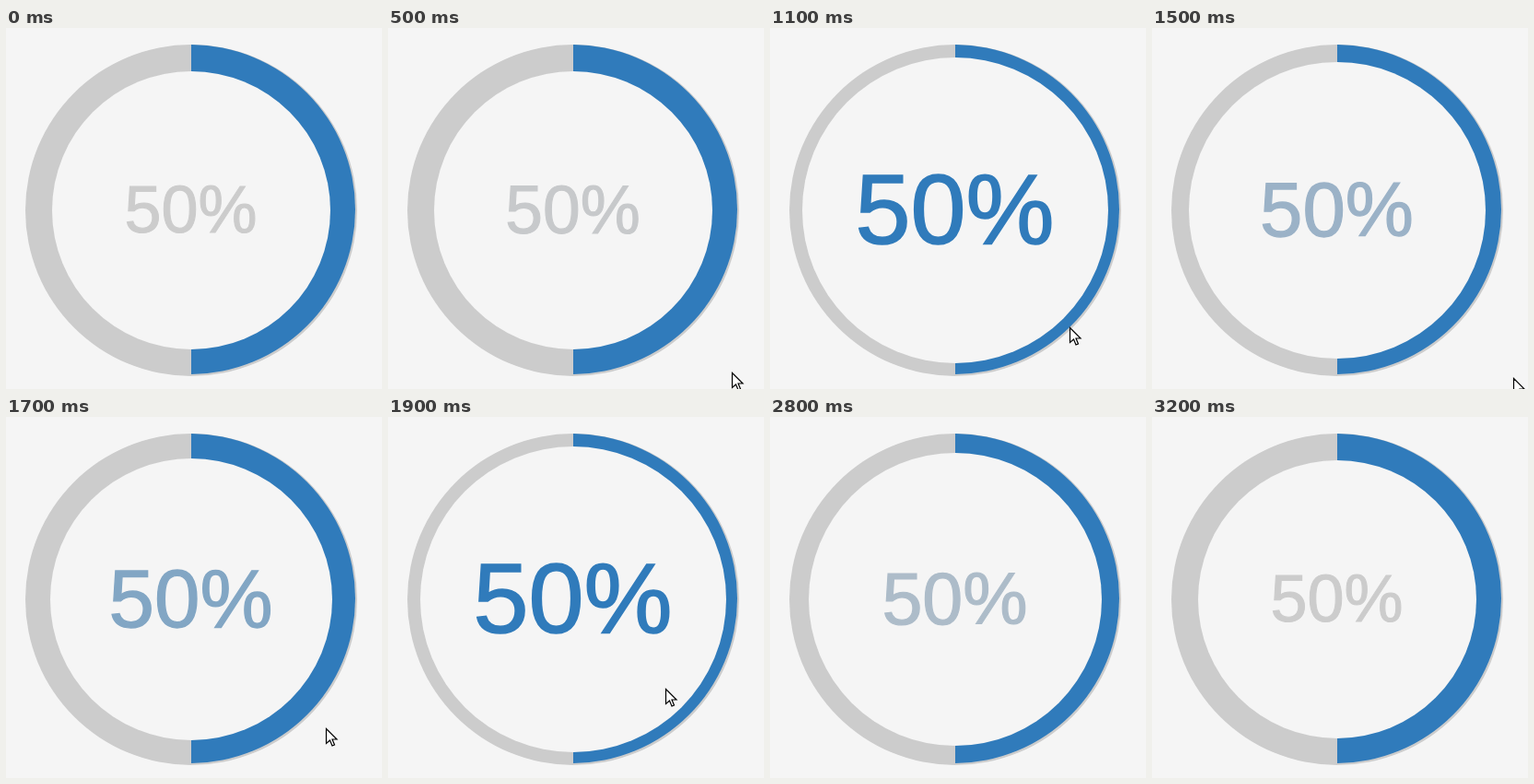
An HTML page with a canvas that plays this animation: 408 by 392 pixels, repeating every 3300 ms.

```html
<!DOCTYPE html>
<html lang="en">
<head>
<meta charset="utf-8">
<title>Percentage circle</title>
<style>
  html, body { margin: 0; width: 100%; height: 100%; overflow: hidden; background: #f5f5f5; }
  canvas { display: block; }
</style>
</head>
<body>
<canvas id="stage" width="408" height="392"></canvas>
<script>
const ctx = document.getElementById('stage').getContext('2d');
const LOOP = 3300, STEP = 100, DURATION = 250;
const SIZE = 360, CX = 201, CY = 198;
const PAPER = '#f5f5f5', GREY = [204, 204, 204], BLUE = [48, 123, 187];

// The pointer is over the circle between these times
const hovers = [{ enter: 495, leave: 1375 }, { enter: 1620, leave: 2645 }];

// Turning points of the pointer, joined by straight moves
const turns = [
  { at: 400, x: 391, y: 393 },
  { at: 1000, x: 285, y: 277 },
  { at: 1200, x: 364, y: 372 },
  { at: 1500, x: 392, y: 380 },
  { at: 1900, x: 301, y: 295 },
  { at: 2600, x: 206, y: 386 }
];
const arrow = new Path2D('M0 0V16L4 12.5L6.5 18.5L9 17.5L6.5 11.5H11.5Z');

const clamp = v => Math.min(1, Math.max(0, v));
const mix = (a, b, p) => a + (b - a) * p;
const rgb = c => `rgb(${c.map(Math.round).join(',')})`;

// cubic-bezier(.42, 0, 1, 1), solved by bisection
function easeIn(t) {
  if (t <= 0 || t >= 1) return clamp(t);
  let lo = 0, hi = 1;
  for (let i = 0; i < 24; i++) {
    const s = (lo + hi) / 2, r = 1 - s;
    if (1.26 * r * r * s + 3 * r * s * s + s ** 3 < t) lo = s; else hi = s;
  }
  return 3 * (1 - lo) * lo * lo + lo ** 3;
}
const easeOut = t => 1 - easeIn(1 - t);

function hoverAmount(time, ease) {
  const done = start => ease(clamp((time - start) / DURATION));
  return hovers.reduce((sum, h) => sum + done(h.enter) - done(h.leave), 0);
}

function disc(x, y, radius, color) {
  ctx.fillStyle = color;
  ctx.beginPath();
  ctx.arc(x, y, radius, 0, Math.PI * 2);
  ctx.fill();
}

function drawRing(p) {
  disc(CX, CY, SIZE / 2, rgb(GREY));
  ctx.save();
  ctx.beginPath();
  ctx.rect(CX, 0, SIZE, 392);
  ctx.clip();
  disc(CX - 1, CY - 1, SIZE / 2 - 1, rgb(BLUE));
  ctx.restore();
  disc(CX, CY, SIZE / 2 - Math.round(SIZE * mix(0.08, 0.04, p)), PAPER);
}

function drawLabel(p) {
  const size = SIZE * mix(0.2, 0.3, p);
  const baseline = CY + size * 0.337;
  ctx.font = `${size}px "Liberation Sans", Arial, sans-serif`;
  ctx.textAlign = 'center';
  ctx.fillStyle = ctx.strokeStyle = rgb(GREY.map((c, i) => mix(c, BLUE[i], p)));
  ctx.lineWidth = size * 0.015;
  ctx.lineJoin = 'miter';
  ctx.fillText('50%', CX - 0.5, baseline);
  ctx.strokeText('50%', CX - 0.5, baseline);
}

function drawPointer(time) {
  const next = turns.findIndex(turn => turn.at > time);
  if (next < 1) return;
  const a = turns[next - 1], b = turns[next];
  const p = (time - a.at) / (b.at - a.at);
  ctx.save();
  ctx.translate(Math.round(mix(a.x, b.x, p)) + 0.5, Math.round(mix(a.y, b.y, p)) + 0.5);
  ctx.fillStyle = '#fff';
  ctx.fill(arrow);
  ctx.strokeStyle = '#000';
  ctx.lineWidth = 1.2;
  ctx.stroke(arrow);
  ctx.restore();
}

function draw(now) {
  const time = Math.floor((now % LOOP) / STEP) * STEP;
  ctx.fillStyle = PAPER;
  ctx.fillRect(0, 0, 408, 392);
  drawRing(hoverAmount(time, easeIn));
  drawLabel(hoverAmount(time, easeOut));
  drawPointer(time);
}

const start = performance.now();
function tick() {
  draw(performance.now() - start);
  requestAnimationFrame(tick);
}
tick();
</script>
</body>
</html>
```
